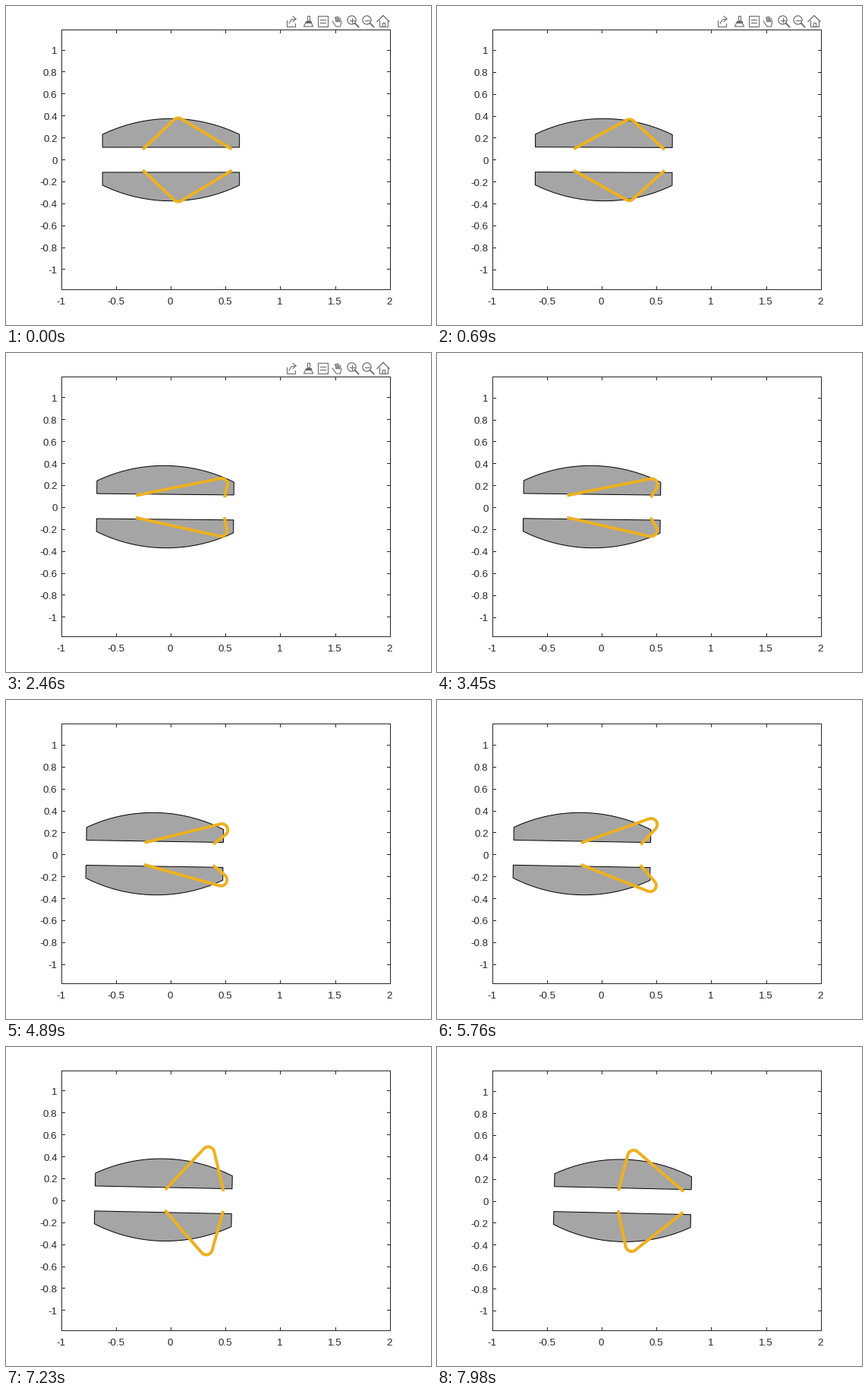
Animation, 560 px wide and 420 px high, one loop 8 s. Source, as a matplotlib script:

```python
import numpy as np
import matplotlib.pyplot as plt
from matplotlib.animation import FuncAnimation
from matplotlib.collections import LineCollection
from matplotlib.patches import Circle, Polygon

W, H = 560, 420
PX = 0.72                      # points per pixel at 100 dpi
UNIT = 144.4                   # pixels per data unit
LEFT, RIGHT, TOP, BOTTOM = 73, 506, 31, 373
MID_Y = 202.5
TICK = 4
INK, ICON, GOLD, GREY = "#262626", "#6a6a6a", "#edb120", "#a5a5a5"

STEP_MS, FRAME_MS, LOOP_MS = 30, 20, 8000
TOOLBAR_OFF = 3360

# Body and limb dimensions, data units
HALF, INNER, CORNER, APEX = 0.625, 0.114, 0.231, 0.375
HINGE_X, HINGE_Y = 0.544, 0.104
LIMB, BEND = 0.976, 0.0554


def body_x(s):
    """Glide to a halt, drift back, then thrust forward."""
    thrust = 0.123 * max(s - 6.05, 0) ** 2
    return 0.044 * (1 - np.exp(-s / 0.15)) - 0.0394 * s + thrust


def body_y(s):
    return 0.009 * np.sin(np.pi * s / 10.5)


def tilt(s):
    return -0.0225 * (s / 8) ** 0.7


def slider(s):
    """One forward pulse per swimming stroke."""
    period, peak = 10.6, 6.65
    pulses = sum(np.exp(-0.16 * (s - peak + k * period) ** 2) for k in (0, 1))
    return -0.274 + 0.316 * pulses


def lift(s):
    """Limb angle in degrees: folds in, rests, then swings out."""
    fold = 31.7 * max(1 - s / 2.6, 0) ** 2
    swing = 65 * max((s - 1.6) / 6.38, 0) ** 4.7
    return 11.8 + fold + swing


def shell():
    sag = APEX - CORNER
    radius = (HALF ** 2 + sag ** 2) / (2 * sag)
    x = np.linspace(-HALF, HALF, 61)
    y = APEX - radius + np.sqrt(radius ** 2 - x ** 2)
    return np.vstack([[-HALF, INNER], np.column_stack([x, y]), [HALF, INNER]])


def limb(start, degrees):
    """Strip of fixed length from slider to hinge with one round fold."""
    a = np.radians(degrees)
    d = HINGE_X - start
    reach = LIMB
    for _ in range(60):
        u = (reach ** 2 - d ** 2) / (2 * (reach - d * np.cos(a)))
        b = np.arctan2(u * np.sin(a), d - u * np.cos(a))
        turn = a + b
        goal = LIMB + BEND * (2 * np.tan(turn / 2) - turn)
        reach += 0.5 * (goal - reach)
    straight = u - BEND * np.tan(turn / 2)
    ox = straight * np.cos(a) + BEND * np.sin(a)
    oy = straight * np.sin(a) - BEND * np.cos(a)
    phi = np.linspace(a + np.pi / 2, np.pi / 2 - b, 24)
    arc = np.column_stack([ox + BEND * np.cos(phi), oy + BEND * np.sin(phi)])
    return np.vstack([[0, 0], arc, [d, 0]]) + [start, HINGE_Y]


SHELL = shell()


def pose(s):
    """Upper and lower shell, upper and lower limb, in data units."""
    c, n = np.cos(tilt(s)), np.sin(tilt(s))
    spin = np.array([[c, n], [-n, c]])
    move = [body_x(s), body_y(s)]
    return [(part * [1, side]) @ spin + move
            for part in (SHELL, limb(slider(s), lift(s))) for side in (1, -1)]


fig = plt.figure(figsize=(W / 100, H / 100), dpi=100, facecolor="white")
ax = fig.add_axes([0, 0, 1, 1])
ax.set_xlim(0, W)
ax.set_ylim(H, 0)
ax.axis("off")


def stroke(xs, ys, color=INK, width=1.0, **kw):
    return ax.plot(xs, ys, color=color, lw=width * PX, **kw)[0]


def label(x, y, value, align):
    return ax.text(x, y, f"{value:g}", ha=align, va="baseline", color=INK,
                   family="Liberation Sans", fontsize=13.33 * PX)


# Frame and x ticks
stroke([LEFT, RIGHT, RIGHT, LEFT, LEFT], [TOP, TOP, BOTTOM, BOTTOM, TOP],
       antialiased=False, solid_joinstyle="miter")
for value in np.arange(-1, 2.1, 0.5):
    x = np.floor(LEFT + (value + 1) * UNIT)
    for edge, inward in ((BOTTOM, -TICK), (TOP, TICK)):
        stroke([x, x], [edge, edge + inward], antialiased=False)
    label(x - 0.5, 393, value, "center")

y_values = [k / 5 for k in range(-5, 6)]
y_labels = [label(67.5, 0, v, "right") for v in y_values]
y_ticks = LineCollection([], colors=INK, linewidths=PX, antialiaseds=False)
ax.add_collection(y_ticks)

shells = [ax.add_patch(Polygon(SHELL, fc=GREY, ec="black", lw=PX, zorder=3))
          for _ in range(2)]
limbs = [stroke([], [], GOLD, 4, zorder=4, solid_capstyle="projecting",
                solid_joinstyle="round") for _ in range(2)]

# Toolbar
toolbar = []


def icon(xs, ys, width=1.1):
    toolbar.append(stroke(xs, ys, ICON, width))


def box(x0, y0, x1, y1, fill="none"):
    corners = [(x0, y0), (x1, y0), (x1, y1), (x0, y1)]
    toolbar.append(ax.add_patch(Polygon(corners, fc=fill, ec=ICON, lw=1.1 * PX)))


def share(x):
    icon([x - 6, x - 6, x + 5, x + 5], [19, 26.5, 26.5, 23])
    icon([x - 3, x, x + 6], [23, 18, 17])
    icon([x + 2, x + 6, x + 2], [13.5, 17, 20.5])


def brush(x):
    box(x - 1, 12.5, x + 2, 19)
    box(x - 3, 19.5, x + 4, 21.5, ICON)
    icon([x - 3, x - 5.5, x + 6.5, x + 4], [21.5, 27, 27, 21.5])


def note(x):
    box(x - 6, 12.5, x + 7, 26.5)
    for y in (17.5, 21.5):
        icon([x - 3, x + 4], [y, y])


def hand(x):
    for k in range(4):
        icon([x - 3 + 2.2 * k, x - 2 + 1.6 * k], [14 + 0.7 * (k - 1) ** 2, 20.5], 1.4)
    icon([x - 7, x - 2, x + 3.5, x + 5], [20, 27, 27, 20])


def lens(x, plus):
    ring = Circle((x - 1.5, 18.5), 5.6, fc="none", ec=ICON, lw=1.2 * PX)
    toolbar.append(ax.add_patch(ring))
    icon([x + 2.7, x + 7.5], [22.7, 27.5], 1.8)
    icon([x - 4.5, x + 1.5], [18.5, 18.5])
    if plus:
        icon([x - 1.5, x - 1.5], [15.5, 21.5])


def home(x):
    icon([x - 8, x, x + 8], [20.5, 12.5, 20.5], 1.3)
    icon([x - 5.5, x - 5.5, x + 5.5, x + 5.5], [19, 27, 27, 19])
    box(x - 1.5, 21.5, x + 1.5, 27)


share(376)
brush(398)
note(417)
hand(437)
lens(457, True)
lens(477, False)
home(497)


def update(i):
    t = (i * FRAME_MS + 10) // STEP_MS * STEP_MS
    parts = pose(t / 1000)
    heights = np.concatenate([p[:, 1] for p in parts])
    center = (heights.max() + heights.min()) / 2   # the y axis follows the data

    def row(y):
        return MID_Y - (y - center) * UNIT

    for artist, part in zip(shells + limbs, parts):
        points = np.column_stack([LEFT + (part[:, 0] + 1) * UNIT, row(part[:, 1])])
        if artist in shells:
            artist.set_xy(points)
        else:
            artist.set_data(*points.T)

    segments = []
    for value, text in zip(y_values, y_labels):
        y = np.floor(row(value))
        segments += [[(LEFT, y), (LEFT + TICK, y)], [(RIGHT - TICK, y), (RIGHT, y)]]
        text.set_y(np.floor(row(value) + 0.5) + 5)
    y_ticks.set_segments(segments)

    for part in toolbar:
        part.set_visible(t < TOOLBAR_OFF)
    return [*shells, *limbs, y_ticks, *y_labels, *toolbar]


anim = FuncAnimation(fig, update, frames=LOOP_MS // FRAME_MS, interval=FRAME_MS,
                     repeat=True, repeat_delay=0, init_func=lambda: update(0))
plt.show()
```
